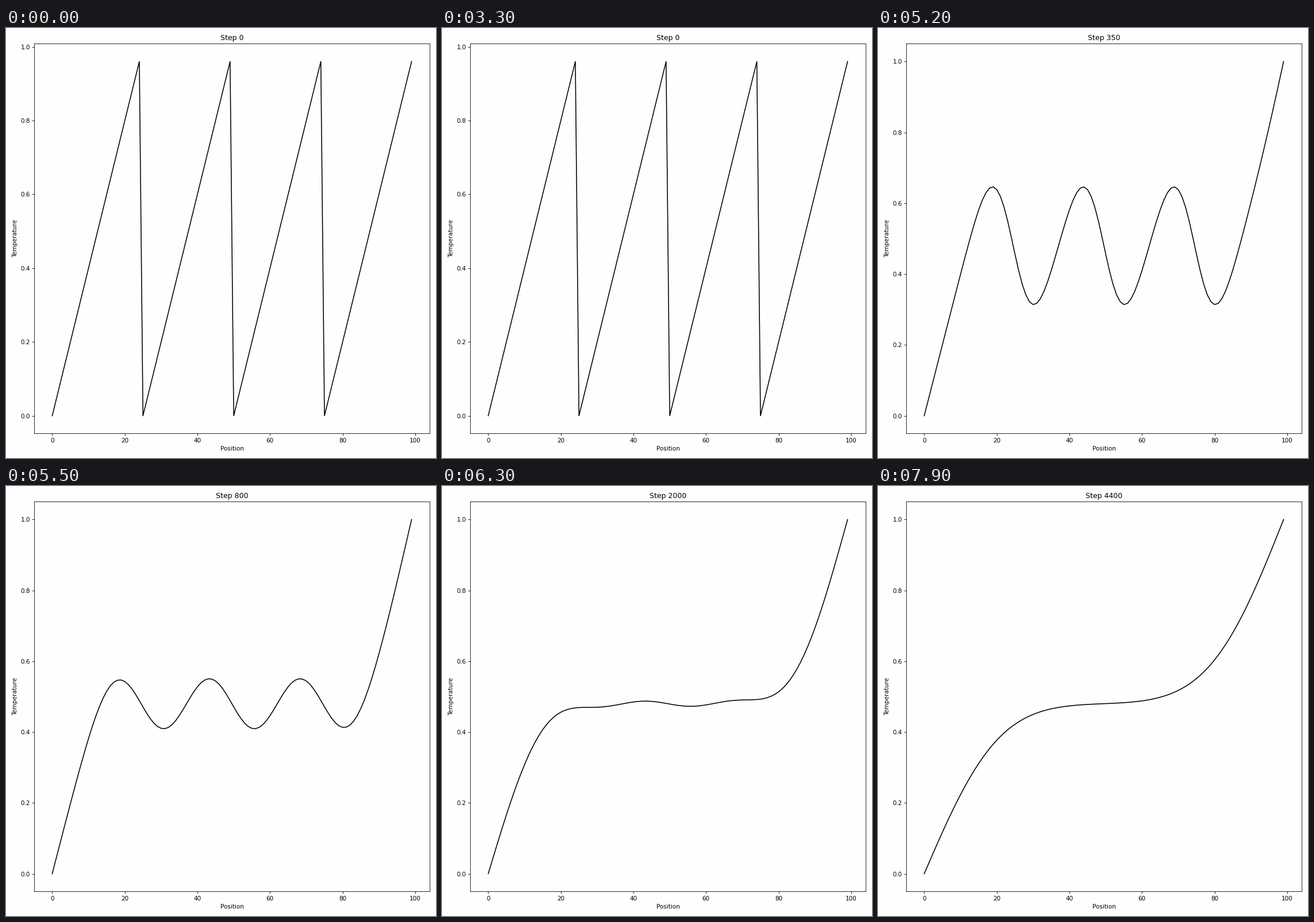
Write a matplotlib script that moves like this. It is 748 px wide and 748 px high and loops after 8 s.

```python
import numpy as np
import matplotlib.pyplot as plt
from matplotlib.animation import FuncAnimation

POINTS = 100
FRAMES, INTERVAL = 80, 100
HOLD = 50            # frames the initial profile stays on screen
DIFFUSION = 0.03
BACKGROUND = "#fefefe"

plt.rcParams["font.family"] = "DejaVu Sans"


def step_at(frame):
    return 0 if frame < HOLD else 50 * (3 * (frame - HOLD) + 1)


def simulate():
    """Temperature profile at every step, ends fixed at 0 and 1."""
    temp = np.arange(POINTS) % 25 / 25
    history = [temp.copy()]
    for _ in range(step_at(FRAMES - 1)):
        temp[0], temp[-1] = 0, 1
        temp[1:-1] += DIFFUSION * (temp[2:] - 2 * temp[1:-1] + temp[:-2])
        history.append(temp.copy())
    return history


profiles = simulate()

fig, ax = plt.subplots(figsize=(10, 10), dpi=74.8, facecolor=BACKGROUND)
ax.set_facecolor(BACKGROUND)
line, = ax.plot(profiles[0], color="black", lw=1.5)
ax.set_xlabel("Position")
ax.set_ylabel("Temperature")
ax.set_title("Step 0")
fig.tight_layout()


def draw(frame):
    step = step_at(frame)
    profile = profiles[step]
    line.set_ydata(profile)
    margin = 0.05 * np.ptp(profile)
    ax.set_ylim(profile.min() - margin, profile.max() + margin)
    ax.set_title(f"Step {step}")
    return line,


anim = FuncAnimation(fig, draw, frames=FRAMES, interval=INTERVAL,
                     repeat=True, repeat_delay=0)
plt.show()
```
